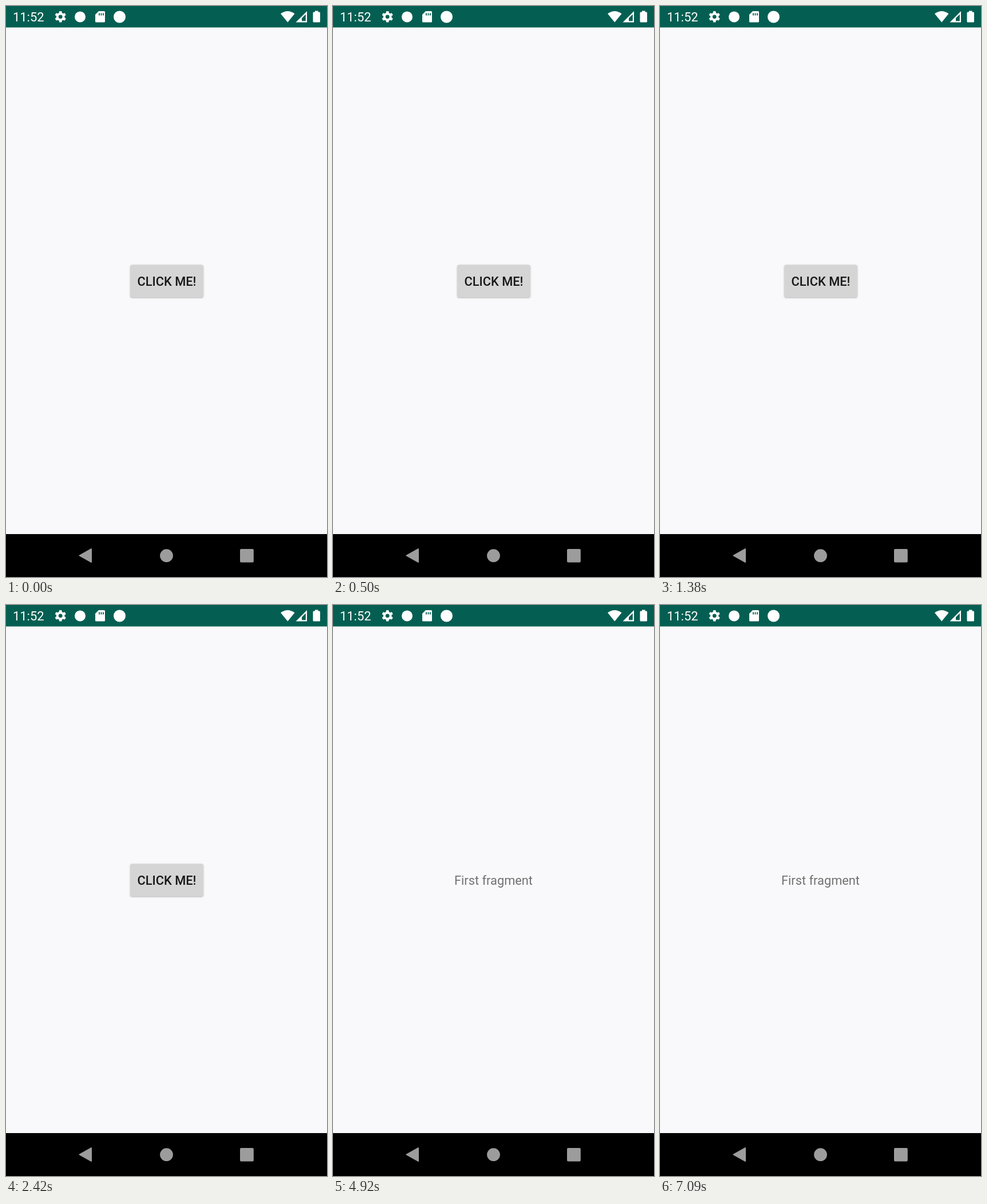
An HTML page for the animation above (7140 ms loop, 561x998 px).

```html
<!DOCTYPE html>
<html lang="en">
<head>
<meta charset="utf-8">
<title>Fragment demo</title>
<style>
  html, body { margin: 0; width: 100%; height: 100%; overflow: hidden; background: #f9f9fb; }
  svg { display: block; width: 561px; height: 998px; font: 21.8px Roboto, sans-serif; }
  #button rect { filter: drop-shadow(0 1.5px 1.5px rgba(0, 0, 0, .3)); }
</style>
</head>
<body>
<svg viewBox="0 0 561 998">
  <rect width="561" height="998" fill="#f9f9fb"/>

  <!-- Status bar -->
  <rect width="561" height="37.5" fill="#045f52"/>
  <g fill="#fff">
    <text x="11.9" y="27" font-size="22">11:52</text>
    <g transform="translate(95.2 18.8)">
      <defs><path id="tooth" d="M-2 -9.8H2L3 -5H-3Z"/></defs>
      <g id="gear"><circle r="7.2"/></g>
      <circle r="3.4" fill="#045f52"/>
    </g>
    <circle cx="129.5" cy="19" r="9.5"/>
    <path d="M162 9H171.5Q173 9 173 10.5V27Q173 28.5 171.5 28.5H157.5Q156 28.5 156 27V15Z"/>
    <path d="M163 12.5V16.5M166.5 12.5V16.5M170 12.5V16.5" stroke="#045f52" stroke-width="1.8"/>
    <circle cx="198.5" cy="19" r="10.5"/>
    <path d="M480 13.5Q492.3 4.5 504.5 13.5L492.3 28.5Z"/>
    <path d="M526 9V28.5H506.5Z"/>
    <path d="M523.8 14.5V26.3H517V21.3Z" fill="#045f52"/>
    <path d="M540 8.5H545.5V10.5H547.5Q549 10.5 549 12V27Q549 28.5 547.5 28.5H538Q536.5 28.5 536.5 27V12Q536.5 10.5 538 10.5H540Z"/>
  </g>

  <!-- Screens -->
  <g id="button">
    <rect x="217.5" y="452.5" width="127" height="56.5" rx="2.5" fill="#d5d5d5"/>
    <text x="281" y="489" text-anchor="middle" font-weight="500" fill="#161616">CLICK ME!</text>
  </g>
  <text id="fragment" x="280.5" y="489.3" text-anchor="middle" fill="#727272">First fragment</text>

  <!-- Navigation bar -->
  <rect y="923" width="561" height="75"/>
  <g fill="#9c9c9c">
    <path d="M128.5 960.5L149 949V972Z" stroke="#9c9c9c" stroke-width="2" stroke-linejoin="round"/>
    <circle cx="280.5" cy="960.7" r="11.4"/>
    <rect x="409" y="949" width="23.8" height="23.5" rx="2"/>
  </g>
</svg>
<script>
  const LOOP = 7140, OPEN_AT = 4230;
  const byId = id => document.getElementById(id);
  const button = byId('button'), fragment = byId('fragment'), gear = byId('gear');

  for (let angle = 0; angle < 360; angle += 60) {
    const tooth = document.createElementNS('http://www.w3.org/2000/svg', 'use');
    tooth.setAttribute('href', '#tooth');
    tooth.setAttribute('transform', `rotate(${angle})`);
    gear.append(tooth);
  }

  const start = performance.now();
  function draw() {
    const opened = (performance.now() - start) % LOOP >= OPEN_AT;
    button.style.display = opened ? 'none' : '';
    fragment.style.display = opened ? '' : 'none';
    requestAnimationFrame(draw);
  }
  draw();
</script>
</body>
</html>
```
